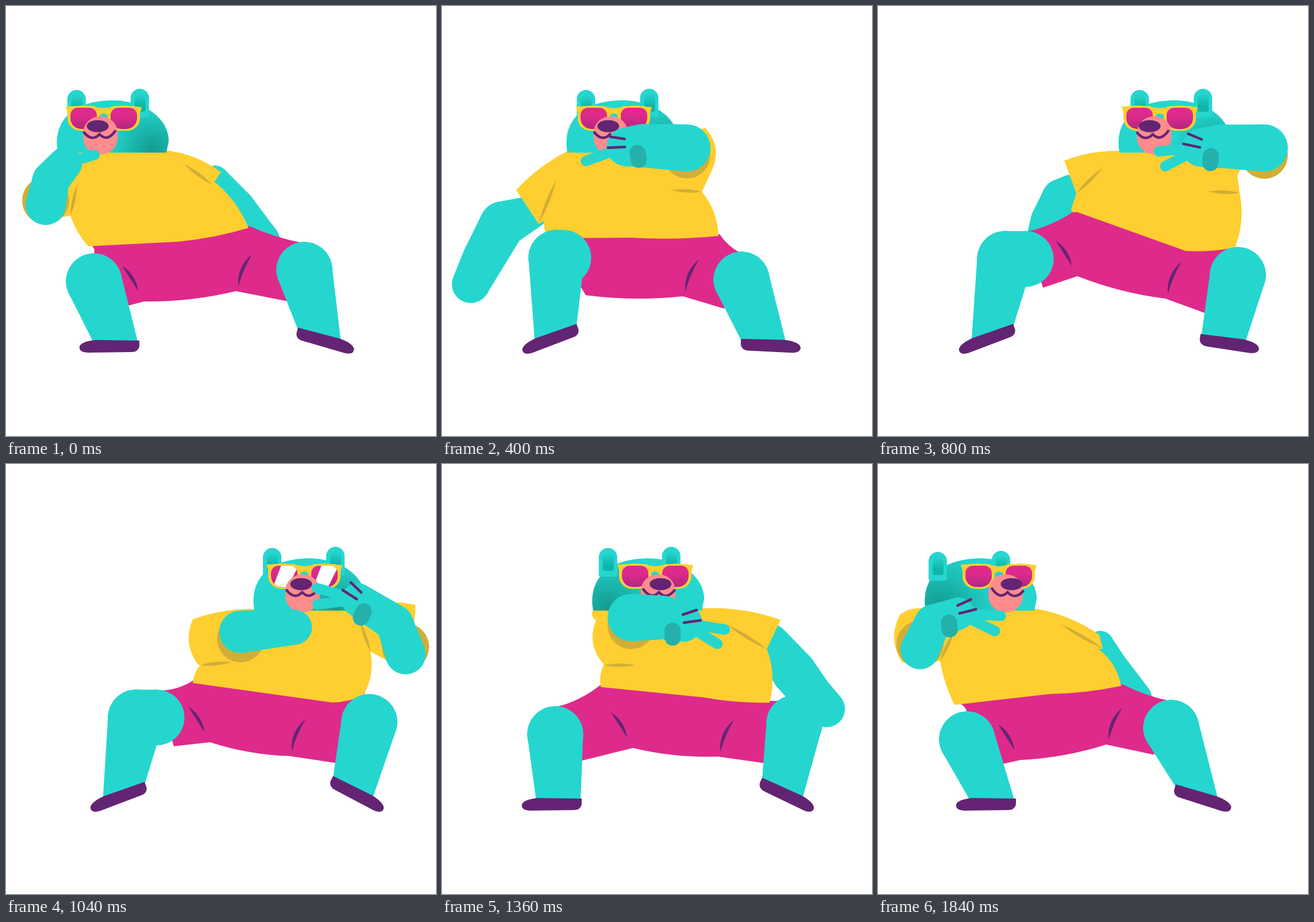
Recreate the animation shown at these times as an HTML page with a canvas. Size 748 by 748 pixels, loop 1920 ms.

```html
<!DOCTYPE html>
<html lang="en">
<head>
<meta charset="utf-8">
<title>Dancing bear</title>
<style>
html, body { margin: 0; width: 100%; height: 100%; overflow: hidden; background: #fff; }
canvas { display: block; width: 100vw; height: 100vh; }
</style>
</head>
<body>
<canvas id="stage" width="748" height="748"></canvas>
<script>
const LOOP = 1920, STEP = 80;
const TEAL = '#25d6ce', CUFF = '#25b0ab', EAR = '#0fb5aa', YELLOW = '#ffce30', OCHRE = '#d1ae38',
  MAGENTA = '#de2a8b', LENS = '#b0267f', PURPLE = '#632573', PINK = '#ff8c8c';
const KNEE = 48.5;

// Joints of the rig at the key times:
// head: x, turn; legs: left knee x y, thigh length, right knee x y, then x and tilt of each foot
// crotch: right and left corner; arm: elbow, wrist, hand, thickness, hand angle, open fingers
// shirt: right tip, under, pit, waist, then hem, then left waist, pit, under, tip
const poses = {
  0: {
    head: '185 -15', legs: '153 479 0 519 459 232 0 508 15.5', crotch: '400 496 240 514',
    armL: '69 346 78 303 104 273 35 -25 .7', armR: '400 351 446 408 452 420 33 0 0',
    shirt: '374 289 359 311 358 302 422 386 300 410 143 418 112 365 98 367 100 300'
  },
  160: { armR: '345 292 300 285 252 280 37 0 0' },
  240: { armL: '78 385 47 432 33 465 38 0 0' },
  400: {
    head: '313 -14', legs: '199 438 12 521 476 234 -20 520 2', crotch: '419 505 250 503',
    armL: '105 380 72 440 50 484 40 0 0', armR: '426 247 350 243 320 245 41 -10 1',
    shirt: '458 212 470 285 452 323 481 400 330 403 185 404 178 374 168 379 129 320'
  },
  800: {
    head: '515 -25', legs: '221 440 36 626 468 235 -20 561 8', crotch: '500 509 347 470',
    armL: '318 334 296 373 285 405 33 0 0', armR: '672 247 595 244 562 246 41 4 2',
    shirt: '612 270 625 295 629 325 621 420 535 426 345 358 336 354 345 326 324 269'
  },
  960: { armR: '711 288 668 256 612 244 37 14 2' },
  1040: {
    head: '527 -8', legs: '226 441 36 632 449 241 -20 569 27', crotch: '493 508 355 484',
    armL: '408 292 450 288 502 284 37 0 0', armR: '695 331 676 277 612 236 35 25 2',
    shirt: '712 245 672 347 634 326 622 402 568 415 325 381 338 350 335 350 325 270'
  },
  1200: { armR: '685 362 705 408 715 438 38 0 0' },
  1360: {
    head: '358 13', legs: '197 470 0 613 451 243 0 557 25', crotch: '480 509 332 494',
    armL: '329 267 385 267 419 276 41 0 2', armR: '612 362 642 400 669 426 39 0 0',
    shirt: '589 271 565 322 566 324 570 415 455 406 276 388 281 350 281 348 268 272'
  },
  1520: {
    head: '318 27', legs: '184 470 0 552 451 242 0 536 21', crotch: '413 501 288 508',
    armL: '177 266 255 270 303 281 41 0 2', armR: '486 352 537 409 545 420 34 0 0',
    shirt: '503 288 460 332 458 334 471 390 430 394 187 414 170 320 165 318 140 250'
  },
  1840: {
    head: '178 32', legs: '155 479 0 510 459 240 0 518 17', crotch: '397 488 247 515',
    armL: '73 323 95 276 140 260 34 -6 2', armR: '400 352 446 408 452 420 33 0 0',
    shirt: '385 297 391 321 384 322 423 386 300 400 133 419 108 343 42 345 38 262'
  }
};

const ctx = document.getElementById('stage').getContext('2d');

const tracks = {};
for (const [t, pose] of Object.entries(poses))
  for (const [part, text] of Object.entries(pose))
    (tracks[part] ||= []).push({ t: +t, v: text.split(' ').map(Number) });

// Cyclic cubic interpolation that never overshoots its keys.
function sample(part, t) {
  const keys = tracks[part], n = keys.length;
  const key = k => {
    const { t, v } = keys[(k + n) % n];
    return { t: t + Math.floor(k / n) * LOOP, v };
  };
  let i = n - 1;
  while (keys[i].t > t) i--;
  const [a, b, c, d] = [i - 1, i, i + 1, i + 2].map(key);
  const span = c.t - b.t, u = (t - b.t) / span;
  const slope = (p, q, j) => (q.v[j] - p.v[j]) / (q.t - p.t);
  const blend = (p, q) => p * q > 0 ? 2 * p * q / (p + q) : 0;
  return b.v.map((y, j) => {
    const s = slope(b, c, j), rise = c.v[j] - y;
    const m0 = blend(slope(a, b, j), s) * span, m1 = blend(s, slope(c, d, j)) * span;
    return y + u * (m0 + u * (3 * rise - 2 * m0 - m1 + u * (m0 + m1 - 2 * rise)));
  });
}

const clamp = (v, lo, hi) => Math.min(hi, Math.max(lo, v));
const pairs = v => v.flatMap((x, i) => i % 2 ? [] : [[x, v[i + 1]]]);
const shift = ([x, y], dx, dy) => [x + dx, y + dy];
const mix = ([x, y], [X, Y], k) => [x + (X - x) * k, y + (Y - y) * k];
const rotate = ([x, y], deg) => {
  const a = deg * Math.PI / 180, c = Math.cos(a), s = Math.sin(a);
  return [x * c - y * s, x * s + y * c];
};

function fill(color) {
  ctx.fillStyle = color;
  ctx.fill();
}

// Closed clockwise outline; bulges[i] bends the edge after point i outwards.
function shape(points, color, bulges = []) {
  ctx.beginPath();
  ctx.moveTo(...points[0]);
  points.forEach(([x, y], i) => {
    const [X, Y] = points[(i + 1) % points.length];
    const dx = X - x, dy = Y - y, k = 2 * (bulges[i] || 0) / (Math.hypot(dx, dy) || 1);
    ctx.quadraticCurveTo((x + X) / 2 + dy * k, (y + Y) / 2 - dx * k, X, Y);
  });
  fill(color);
}

const crease = (a, b, color, bend = 0) => shape([a, b], color, [3 + bend, 3 - bend]);

function ellipse([x, y], rx, ry, color) {
  ctx.beginPath();
  ctx.ellipse(x, y, rx, ry, 0, 0, 7);
  fill(color);
}

function line(a, b, width, color) {
  ctx.beginPath();
  ctx.moveTo(...a);
  ctx.lineTo(...b);
  ctx.lineWidth = width;
  ctx.strokeStyle = color;
  ctx.stroke();
}

// Two discs joined by their outer tangents.
function taper(a, r, b, R) {
  ellipse(a, r, r, TEAL);
  ellipse(b, R, R, TEAL);
  const dx = b[0] - a[0], dy = b[1] - a[1], d = Math.hypot(dx, dy);
  if (d <= Math.abs(r - R)) return;
  const dir = Math.atan2(dy, dx), off = Math.acos((r - R) / d);
  const rim = ([x, y], q, s) => [x + q * Math.cos(dir + s * off), y + q * Math.sin(dir + s * off)];
  shape([rim(a, r, 1), rim(b, R, 1), rim(b, R, -1), rim(a, r, -1)], TEAL);
}

function limb({ elbow, wrist, hand, r }) {
  taper(elbow, r, wrist, r * .92);
  taper(wrist, r * .92, hand, r * .82);
}

function hangingArm(arm) {
  const { tip, under, pit } = arm.sleeve;
  taper(mix(mix(tip, under, .5), pit, 1 / 3), arm.r * .7, arm.elbow, arm.r);
  limb(arm);
}

function raisedArm(arm) {
  limb(arm);
  const at = (x, y) => shift(arm.hand, ...rotate([-x * arm.side, y], arm.angle));
  const first = clamp(arm.open, 0, 1), second = clamp(arm.open - 1, 0, 1);
  line(arm.hand, at(73 * first, 12 * first), 18, TEAL);
  line(arm.hand, at(60 * second, 37 * second), 18, TEAL);
  if (arm.open < 1) return;
  line(at(-18, 14), at(-18, 26), 28, CUFF);
  line(at(0, -14), at(24, -22), 4.5, PURPLE);
  line(at(2, 0), at(31, -4), 4.5, PURPLE);
}

// Shaded inside of the sleeve: under a level forearm, behind an upright one.
function sleeveShade({ elbow, wrist }) {
  ellipse(shift(elbow, 0, 14 - Math.abs(wrist[1] - elbow[1]) / 2), 41, 41, OCHRE);
}

function sleeveFold({ front, elbow, wrist, sleeve }, neck) {
  const { under, pit } = sleeve;
  const dx = wrist[0] - elbow[0], dy = wrist[1] - elbow[1], k = 55 / Math.hypot(dx, dy);
  if (front) crease(shift(pit, dx * k, dy * k), pit, OCHRE);
  else crease(mix(under, neck, .6), under, OCHRE);
}

function leg(knee, thigh, x, tilt, side) {
  const heel = [x, 582 - 1.45 * Math.abs(tilt)];
  const at = (px, py) => shift(heel, ...rotate([px * side, py], tilt));
  const back = at(2, 5), front = at(79, 5);
  taper(shift(knee, thigh, 0), KNEE, knee, KNEE);
  taper(knee, KNEE, back, 0);
  taper(knee, KNEE, front, 0);
  shape([knee, back, front], TEAL);

  ctx.beginPath();
  ctx.moveTo(...heel);
  ctx.lineTo(...at(0, 10));
  ctx.quadraticCurveTo(...at(2, 20), ...at(14, 20));
  ctx.lineTo(...at(90, 21));
  ctx.quadraticCurveTo(...at(106, 20), ...at(104, 10));
  ctx.quadraticCurveTo(...at(100, 1), ...at(75, -1));
  fill(PURPLE);
}

function ear(x, y) {
  ctx.beginPath();
  ctx.roundRect(x - 16, y, 32, 50, [16, 16, 4, 4]);
  fill(TEAL);
  const g = ctx.createLinearGradient(0, y + 8, 0, y + 30);
  g.addColorStop(0, TEAL);
  g.addColorStop(1, EAR);
  ctx.beginPath();
  ctx.roundRect(x - 9, y + 9, 19, 31, [9, 9, 3, 3]);
  fill(g);
}

function glasses(x, glint) {
  shape([[-66, 175], [-35, 173], [0, 178], [35, 173], [66, 176], [62, 190], [-62, 188]]
    .map(p => shift(p, x, 0)), YELLOW);
  const tint = ctx.createLinearGradient(0, 190, 0, 216);
  tint.addColorStop(0, MAGENTA);
  tint.addColorStop(1, LENS);
  for (const cx of [x - 35, x + 35]) {
    ctx.beginPath();
    ctx.roundRect(cx - 28, 174, 56, 43, [12, 12, 22, 22]);
    fill(YELLOW);
    ctx.save();
    ctx.beginPath();
    ctx.roundRect(cx - 23, 177, 46, 37, [13, 13, 19, 19]);
    fill(tint);
    ctx.clip();
    if (glint !== null)
      shape([[-5, 176], [25, 176], [6, 215], [-20, 215]].map(p => shift(p, cx + glint, 0)), '#fff');
    ctx.restore();
  }
  ellipse([x, 191], 5, 4, TEAL);
}

// The face slides sideways with the turn, nearer parts further.
function drawHead(x, turn, glint) {
  ctx.save();
  ctx.beginPath();
  ctx.moveTo(x - 95, 255);
  ctx.bezierCurveTo(x - 104, 205, x - 75, 165, x, 164);
  ctx.bezierCurveTo(x + 60, 165, x + 98, 198, x + 98, 235);
  ctx.lineTo(x + 94, 255);
  fill(TEAL);
  ctx.clip();
  const shade = x - clamp(turn * 6, -70, 70), size = 85 + turn / 2;
  const g = ctx.createRadialGradient(shade, 250, 0, shade, 250, size);
  g.addColorStop(0, 'rgba(14,140,130,.8)');
  g.addColorStop(1, 'rgba(14,140,130,0)');
  ctx.fillStyle = g;
  ctx.fillRect(x - 110, 160, 220, 96);
  ctx.restore();

  const earX = x - 66 - turn / 4, earY = 146 + Math.max(0, turn - 18) / 2;
  ear(earX, earY);
  ear(earX + 110, earY - 2);
  glasses(x + turn, glint);

  const snout = x + turn * 1.38, mouth = snout + turn * .1, tilt = turn * .07;
  ctx.beginPath();
  ctx.roundRect(snout - 30, 192, 60, 66, 29);
  fill(PINK);
  ellipse([x + turn * 1.7, 209], 19, 10.5, PURPLE);
  ctx.beginPath();
  ctx.moveTo(mouth - 27, 219 - tilt);
  ctx.quadraticCurveTo(mouth - 13, 237, mouth, 223);
  ctx.quadraticCurveTo(mouth + 13, 237, mouth + 27, 219 + tilt);
  ctx.lineWidth = 4.5;
  ctx.strokeStyle = PURPLE;
  ctx.stroke();
}

function readArm(part, t, side, front, sleeve) {
  const v = sample(part, t), [elbow, wrist, hand] = pairs(v.slice(0, 6));
  const [r, angle, open] = v.slice(6);
  return { side, front, sleeve, elbow, wrist, hand, r, angle, open };
}

function draw(t) {
  const [headX, turn] = sample('head', t);
  const [lx, ly, thigh, rx, ry, footL, tiltL, footR, tiltR] = sample('legs', t);
  const [crotchR, crotchL] = pairs(sample('crotch', t));
  const [tipR, underR, pitR, waistR, hem, waistL, pitL, underL, tipL] = pairs(sample('shirt', t));
  const kneeL = [lx, ly], kneeR = [rx, ry];
  const neckL = [headX - 94, 252], neckR = [headX + 92, 251];
  const left = readArm('armL', t, -1, t < 120 || t >= 1000, { tip: tipL, under: underL, pit: pitL });
  const right = readArm('armR', t, 1, t >= 120 && t < 1180, { tip: tipR, under: underR, pit: pitR });
  const arms = [left, right], raised = arms.filter(a => a.front);

  ctx.fillStyle = '#fff';
  ctx.fillRect(0, 0, 748, 748);
  ctx.lineCap = ctx.lineJoin = 'round';

  arms.filter(a => !a.front).forEach(hangingArm);

  const hemDrop = 50 + .4 * (rx - footR);
  shape([shift(waistL, 0, -4), shift(waistR, 2, -3), shift(kneeR, -3, -47), shift(kneeR, -30, hemDrop),
    crotchR, crotchL, shift(kneeL, thigh + 30, 50), shift(kneeL, thigh, -47)],
    MAGENTA, [0, -3, 0, 0, 5, 0, 0, -5]);
  crease(shift(crotchR, 28, -64), shift(crotchR, 4, -8), PURPLE, -5);
  crease(shift(crotchL, -38, -62), shift(crotchL, -10, -18), PURPLE, 3);

  const cuffBend = arm => arm.front ? 12 : 0;
  shape([neckL, neckR, tipR, underR, pitR, waistR, hem, waistL, pitL, underL, tipL], YELLOW,
    [0, 7, cuffBend(right), 0, 7, 3, 0, 3, 0, cuffBend(left), 5]);
  sleeveFold(left, neckL);
  sleeveFold(right, neckR);

  leg(kneeL, thigh, footL, tiltL, -1);
  leg(kneeR, 0, footR, tiltR, 1);

  raised.forEach(sleeveShade);
  const shine = t - 1040;
  drawHead(headX, turn, Math.abs(shine) <= STEP ? shine * .3 : null);
  raised.forEach(raisedArm);
}

const start = performance.now();
function tick() {
  const t = (performance.now() - start) % LOOP;
  draw(Math.floor(t / STEP) * STEP);
  requestAnimationFrame(tick);
}
tick();
</script>
</body>
</html>
```
